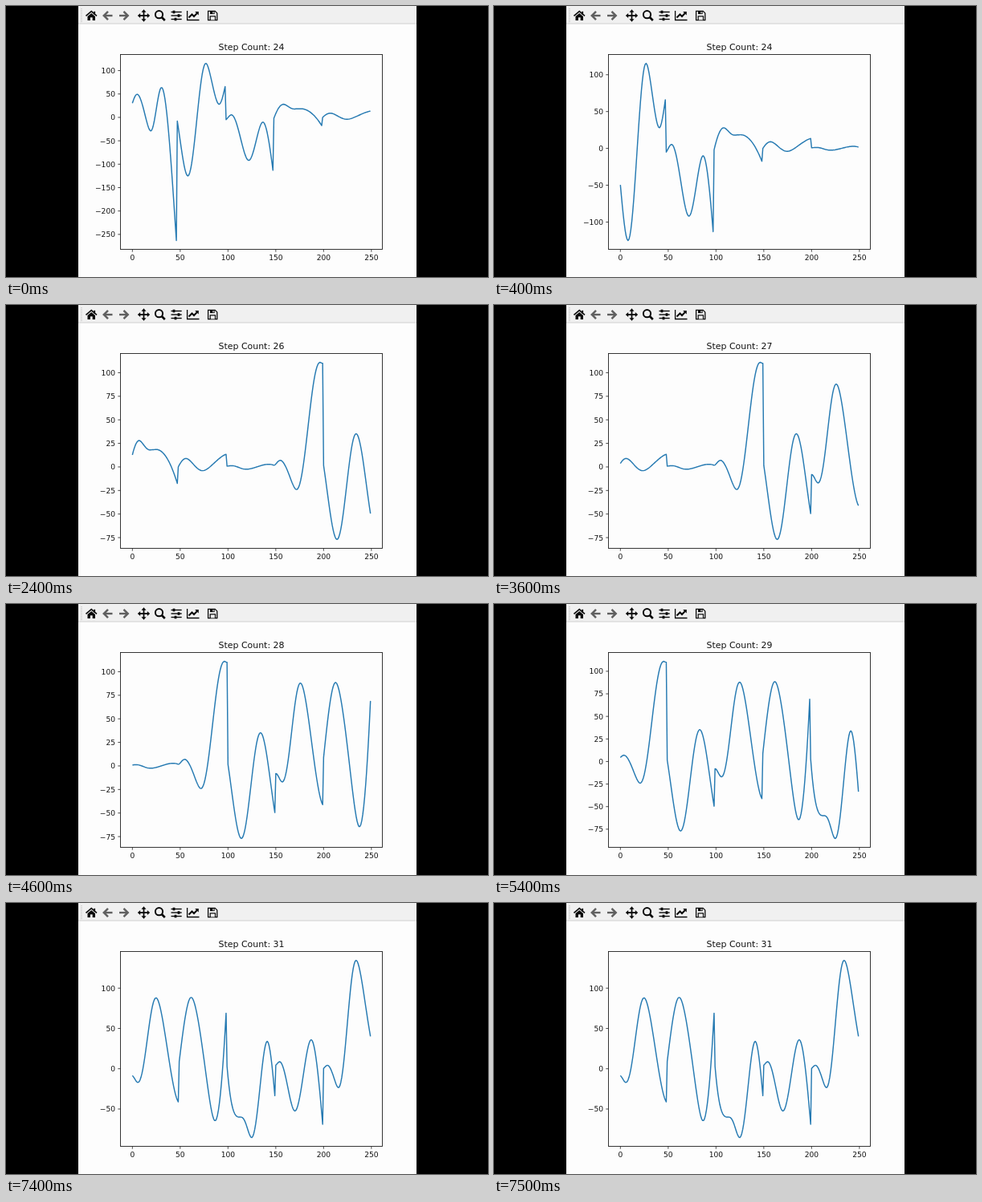
Write an HTML page with a canvas that moves like this. It is 600 px wide and 338 px high and loops after 8 s.

```html
<!DOCTYPE html>
<html lang="en">
<head>
<meta charset="utf-8">
<title>Step Count</title>
<style>
  html, body { margin: 0; width: 100%; height: 100%; overflow: hidden; background: #000; }
  canvas { display: block; width: 600px; height: 338px; }
</style>
</head>
<body>
<canvas id="stage"></canvas>
<script>
const canvas = document.getElementById('stage');
const ctx = canvas.getContext('2d');
const ratio = window.devicePixelRatio || 1;
canvas.width = 600 * ratio;
canvas.height = 338 * ratio;

const LOOP = 8000;
const SAMPLES = 250;
const VISIBLE_WAVES = 5;
const CHANGES = [400, 1400, 2400, 3400, 4500, 5400, 6400, 7400];
const BOX = { left: 142.5, right: 468.5, top: 60.5, bottom: 303.5 };
const FONT = '"DejaVu Sans", sans-serif';
const INK = '#0a0a0a';
const PANEL = '#f0f0f0';

// Waves follow each other about every 50 samples, slightly faster with time.
function waveStart(index) {
  const k = index - 2;
  return Math.round(50.76 * k - 0.035 * k * k - 3.4);
}

// First value, turning points [x, y], last value (left out if a turn lies past the end).
const waves = [
  wave(3, [[9, 49.5], [23.2, -29], [34.5, 64]], -263),
  wave(-8, [[11, -125], [29.8, 115.5], [43.7, 28]], 66),
  wave(-5, [[5.5, 5.5], [23.7, -92], [38.5, -10]], -113),
  wave(-2, [[10, 28], [21.5, 18], [28, 18.5]], -17.5),
  wave(0, [[8, 9], [25.4, -4], [53, 14]]),
  wave(0.8, [[5, 1.3], [20, -2.4]], 1.8),
  wave(2, [[5.7, 7], [22.7, -24], [47.2, 111]], 110),
  wave(1.5, [[14, -77], [34, 35.3]], -49.5),
  wave(-8, [[6.8, -17], [25.7, 88], [50.5, -42.5]]),
  wave(9, [[12.5, 88.6], [37.5, -64.6]], 69),
  wave(3, [[14, -60], [25.7, -85.4], [42, 34]], -33.5),
  wave(4.5, [[4, 8.7], [20, -52.5], [37, 36]], -69),
  wave(0.5, [[4, 4.3], [15.5, -23.5], [34, 134.5], [57, 8]])
].map((build, index) => build(index));

// Turning points are flat and get a curvature averaged from both sides.
function wave(first, turns, last) {
  return index => {
    const length = waveStart(index + 1) - waveStart(index) - 1;
    const knots = [{ x: 0, y: first }, ...turns.map(([x, y]) => ({ x, y, flat: true }))];
    if (last !== undefined) knots.push({ x: length, y: last });
    knots.forEach((knot, i) => {
      const bends = [knots[i - 1], knots[i + 1]].filter(Boolean)
        .map(side => (side.flat ? 6 : 3) * (side.y - knot.y) / (side.x - knot.x) ** 2);
      knot.bend = bends.reduce((a, b) => a + b) / bends.length;
    });
    return knots;
  };
}

function between(a, b, x) {
  if (!a.flat) [a, b] = [b, a];
  const width = b.x - a.x, rise = b.y - a.y;
  const t = (x - a.x) / width, s = 1 - t;
  const bendA = a.bend * width * width / 2;
  if (!b.flat) return a.y + bendA * t * t + (rise - bendA) * t ** 3;
  const bendB = b.bend * width * width / 2;
  return a.y + rise * t ** 3 * (10 - 15 * t + 6 * t * t)
    + bendA * t * t * s ** 3 + bendB * t ** 3 * s * s;
}

function signal(sample) {
  const index = waves.findLastIndex((_, i) => waveStart(i) <= sample);
  const knots = waves[index];
  const x = sample - waveStart(index);
  const next = Math.max(1, knots.findIndex(knot => knot.x >= x));
  return between(knots[next - 1], knots[next], x);
}

function path(points, close) {
  ctx.beginPath();
  for (let i = 0; i < points.length; i += 2) ctx.lineTo(points[i], points[i + 1]);
  if (close) ctx.closePath();
}

function fill(points, color) {
  ctx.fillStyle = color;
  path(points, true);
  ctx.fill();
}

function stroke(points, color, width) {
  ctx.strokeStyle = color;
  ctx.lineWidth = width;
  path(points);
  ctx.stroke();
}

function rect(x, y, w, h, color) {
  ctx.fillStyle = color;
  ctx.fillRect(x, y, w, h);
}

function text(value, x, y, size, align) {
  ctx.font = `${size}px ${FONT}`;
  ctx.textAlign = align;
  ctx.fillStyle = '#111';
  ctx.fillText(value, x, y);
}

function arrow(x, dir) {
  stroke([x + 6 * dir, 12, x - 4 * dir, 12], '#606060', 2.4);
  stroke([x + 0.5 * dir, 6.8, x - 4.7 * dir, 12, x + 0.5 * dir, 17.2], '#606060', 2.5);
}

function drawHome() {
  stroke([99.5, 12.4, 106.3, 6.6, 113, 12.4], INK, 1.6);
  fill([101.5, 13, 106.3, 9, 111, 13, 111, 18, 101.5, 18], INK);
  rect(104.9, 14.3, 2.8, 3.7, PANEL);
  rect(109.3, 6.8, 1.8, 4, INK);
}

function drawPan() {
  for (let k = 0; k < 4; k++) {
    ctx.save();
    ctx.translate(171.5, 12);
    ctx.rotate(k * Math.PI / 2);
    rect(-0.9, -5, 1.8, 5, INK);
    fill([0, -7.7, 3, -4.3, -3, -4.3], INK);
    ctx.restore();
  }
}

function drawZoom() {
  ctx.strokeStyle = INK;
  ctx.lineWidth = 2;
  ctx.beginPath();
  ctx.arc(190.5, 10.7, 4.6, 0, 7);
  ctx.stroke();
  stroke([193.8, 14, 197.8, 18], INK, 2.6);
}

function drawSliders() {
  [209, 215, 211].forEach((knob, i) => {
    const y = 7.5 + 4.5 * i;
    stroke([205.5, y, 218.7, y], INK, 1.4);
    rect(knob - 1.4, y - 1.8, 2.8, 3.6, INK);
  });
}

function drawChart() {
  stroke([225.6, 6, 225.6, 17.5, 240.5, 17.5], INK, 1.3);
  stroke([227.5, 14.5, 231.5, 10.5, 234, 13, 238, 8.8], INK, 2);
  fill([235.2, 7, 239.8, 7, 239.8, 11.6], INK);
}

function drawSave() {
  stroke([251.6, 6.3, 260.2, 6.3, 262.8, 8.9, 262.8, 17.7, 251.6, 17.7, 251.6, 5.7], INK, 1.3);
  rect(254, 6.5, 5.6, 3.6, INK);
  rect(257.3, 7.2, 1.3, 2.1, PANEL);
  rect(253.6, 12.2, 7.5, 5.2, INK);
  rect(254.8, 13.4, 5.1, 4, PANEL);
}

function drawToolbar() {
  rect(90, 0, 421, 22, PANEL);
  rect(90, 21.5, 421, 1, '#d2d2d2');
  for (let y = 3; y < 20; y += 2) rect(93.5, y, 1, 1, '#b4b4b4');
  drawHome();
  arrow(126.5, 1);
  arrow(147, -1);
  drawPan();
  drawZoom();
  drawSliders();
  drawChart();
  drawSave();
}

function tickStep(span) {
  const rough = span / 9;
  const base = 10 ** Math.floor(Math.log10(rough));
  return base * [1, 2, 2.5, 5, 10].find(m => m * base >= rough);
}

function drawPlot(step) {
  const { left, right, top, bottom } = BOX;
  const offset = waveStart(step + VISIBLE_WAVES) - SAMPLES;
  const values = Array.from({ length: SAMPLES }, (_, i) => signal(i + offset));
  const min = Math.min(...values), max = Math.max(...values);
  const margin = (max - min) * 0.05;
  const low = min - margin, high = max + margin;
  const xMargin = (SAMPLES - 1) * 0.05;
  const toX = v => left + (v + xMargin) / (SAMPLES - 1 + 2 * xMargin) * (right - left);
  const toY = v => bottom - (v - low) / (high - low) * (bottom - top);

  ctx.lineJoin = 'round';
  stroke(values.flatMap((v, i) => [toX(i), toY(v)]), '#267ab2', 1.45);
  ctx.lineJoin = 'miter';

  for (let v = 0; v <= 250; v += 50) {
    stroke([toX(v), bottom, toX(v), bottom + 3.2], '#111', 0.75);
    text(v, toX(v), 317.1, 9.13, 'center');
  }
  const gap = tickStep(high - low);
  for (let v = Math.ceil(low / gap) * gap; v <= high; v += gap) {
    const y = toY(v);
    stroke([left - 3.2, y, left, y], '#111', 0.75);
    text(v < 0 ? '\u2212' + -v : Math.abs(v), left - 6.5, y + 3.4, 9.13, 'right');
  }
  ctx.strokeStyle = '#222';
  ctx.lineWidth = 0.9;
  ctx.strokeRect(left, top, right - left, bottom - top);
  text('Step Count: ' + Math.max(24, 23 + step), (left + right) / 2, 54.7, 10.95, 'center');
}

function render(time) {
  ctx.setTransform(ratio, 0, 0, ratio, 0, 0);
  rect(0, 0, 600, 338, '#000');
  rect(90, 0, 421, 338, '#fdfdfd');
  drawToolbar();
  drawPlot(CHANGES.filter(at => at <= time).length);
}

const start = performance.now();
function tick() {
  render((performance.now() - start) % LOOP);
  requestAnimationFrame(tick);
}
tick();
</script>
</body>
</html>
```
